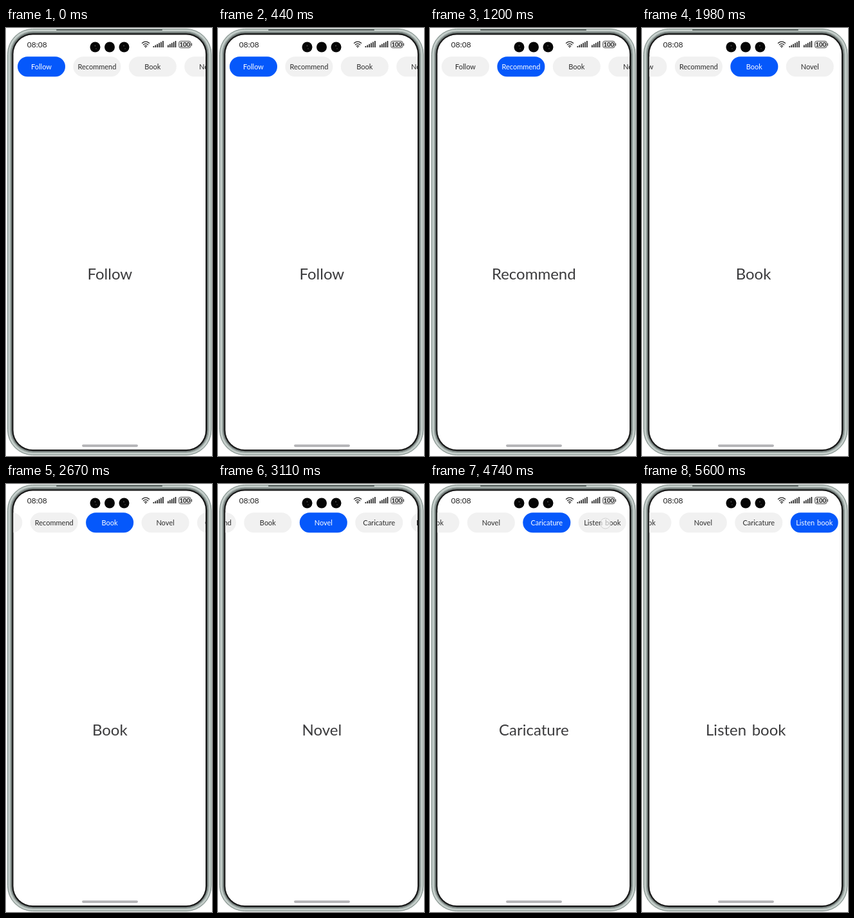
Animation of 320x662 px, one loop 5.81 s. Source, as an HTML page:

```html
<!DOCTYPE html>
<html lang="en">
<head>
<meta charset="utf-8">
<title>Swipe tabs</title>
<style>
  html, body { margin: 0; width: 100%; height: 100%; overflow: hidden; background: #fff; }
  svg { display: block; width: 100%; height: 100%; }
  text { font-family: Lato, "Open Sans", sans-serif; word-spacing: .1em; }
  .mid { text-anchor: middle; }
  .tab { font-size: 11px; fill: #2b2b2b; }
  .tab rect { fill: #f1f1f1; }
  .tab.on { fill: #fff; }
  .tab.on rect { fill: #0558fb; }
  .page { font-size: 24px; fill: #3b3b3d; }
</style>
</head>
<body>
<svg id="stage" viewBox="0 0 320 662">
  <defs>
    <clipPath id="screen"><rect x="11.5" y="10.5" width="298.5" height="641.5" rx="30"/></clipPath>
  </defs>

  <g id="body">
    <rect x="2.5" y="1.5" width="316.5" height="659" rx="39" fill="#a9b5b1" stroke="#82908b"/>
    <rect x="4.8" y="3.5" width="312" height="655" rx="37" fill="none" stroke="#c9d1ce" stroke-width="2"/>
    <rect x="7.5" y="6" width="306.5" height="650" rx="34.5" fill="#6f7876" stroke="#8b9592"/>
    <rect x="9.3" y="8.2" width="303" height="646" rx="32.5" fill="#161616"/>
    <rect x="11.5" y="10.5" width="298.5" height="641.5" rx="30" fill="#fff"/>
    <rect x="78" y="2" width="165" height="2" rx="1" fill="#59615f"/>
  </g>

  <g clip-path="url(#screen)">
    <g id="pages"></g>
    <g id="tabs"></g>
    <circle id="touch" r="8" fill="#f8f8f8" fill-opacity=".65" stroke="#c8c8c8" stroke-width=".8"/>
  </g>

  <g id="status" fill="#222">
    <text x="32.8" y="30" font-size="12">08:08</text>
    <g fill="#050505">
      <circle cx="138.5" cy="29.5" r="8"/>
      <circle cx="161" cy="29.5" r="8"/>
      <circle cx="183.5" cy="29.5" r="8"/>
    </g>
    <g fill="#4a4a4a">
      <circle cx="138.5" cy="27.5" r="1"/><circle cx="140" cy="32" r=".8"/>
      <circle cx="183" cy="27.5" r="1"/><circle cx="185" cy="32" r=".8"/>
    </g>
    <g fill="none" stroke="#222" stroke-width="1.3" stroke-linecap="round">
      <path d="M211.4 23.4q5.6-4.6 11.2 0M213.4 25.8q3.6-3 7.2 0M215.3 28q1.7-1.3 3.4 0"/>
    </g>
    <circle cx="217" cy="29.6" r=".9"/>
    <g id="bars"></g>
    <rect x="268.5" y="20.3" width="18.5" height="10.4" rx="3" fill="#e4e4e4" stroke="#555"/>
    <path d="M288.4 23.5v4" stroke="#555" stroke-width="1.4"/>
    <text x="277.8" y="29.1" class="mid" font-size="9.5" font-weight="700">100</text>
  </g>
  <rect x="118" y="644.3" width="87" height="3.6" rx="1.8" fill="#b3b3b6"/>
</svg>

<script>
const LOOP = 5810, PITCH = 86.4, WIDTH = 298.5, DRAG = 60, HOLD = 70;
const names = ["Follow", "Recommend", "Book", "Novel", "Caricature", "Listen book"];
const scrolls = [0, 0, 66.7, 153, 219.3, 219.3];

// Each move advances one page; taps show a touch point first.
const moves = [
  { at: 852, swipe: true },
  { at: 1740, swipe: true },
  { at: 2670, swipe: true },
  { at: 3840, x: 253, y: 53 },
  { at: 4820, x: 272.5, y: 61 }
];

const $ = id => document.getElementById(id);
const clamp = v => Math.min(1, Math.max(0, v));
const easeOut = v => 1 - (1 - clamp(v)) ** 3;

function add(parent, tag, attrs, text) {
  const el = document.createElementNS("http://www.w3.org/2000/svg", tag);
  for (const key in attrs) el.setAttribute(key, attrs[key]);
  if (text) el.textContent = text;
  parent.appendChild(el);
  return el;
}

const tabs = names.map((name, i) => {
  const tab = add($("tabs"), "g", { class: "tab" });
  add(tab, "rect", { x: 18 + i * PITCH, y: 44.2, width: 74, height: 31, rx: 15.5 });
  add(tab, "text", { x: 55 + i * PITCH, y: 63.6, class: "mid" }, name);
  return tab;
});

names.forEach((name, i) =>
  add($("pages"), "text", { x: 161.3 + i * WIDTH, y: 389, class: "mid page" }, name));

function bars(x, n, low) {
  for (let i = 0; i < n; i++) {
    const h = i < low ? 2 : 2 + (i - low + 1) * 1.6;
    add($("bars"), "rect", { x: x + i * 2.9, y: 30 - h, width: 1.7, height: h });
  }
}
bars(228.5, 6, 1);
bars(251, 5, 0);

function pageShift(move, t) {
  const s = t - move.at;
  if (!move.swipe) return WIDTH * easeOut(s / 300);
  if (s < HOLD) return DRAG * clamp(s / HOLD) ** 2;
  return DRAG + (WIDTH - DRAG) * easeOut((s - HOLD) / 270);
}

function tabShift(move, t) {
  const s = t - move.at;
  return move.swipe ? 1 - Math.exp(-Math.max(0, s - HOLD) / 106) : easeOut(s / 300);
}

function draw(t) {
  let page = 0, scroll = 0, active = 0, tap = null;
  moves.forEach((move, i) => {
    page += pageShift(move, t);
    scroll += (scrolls[i + 1] - scrolls[i]) * tabShift(move, t);
    if (t >= move.at + (move.swipe ? HOLD : 0)) active = i + 1;
    if (!move.swipe && t >= move.at - 80 && t < move.at + 40) tap = move;
  });
  $("pages").setAttribute("transform", `translate(${-page} 0)`);
  $("tabs").setAttribute("transform", `translate(${-scroll} 0)`);
  tabs.forEach((tab, i) => tab.classList.toggle("on", i === active));
  $("touch").setAttribute("visibility", tap ? "visible" : "hidden");
  if (tap) $("touch").setAttribute("transform", `translate(${tap.x} ${tap.y})`);
}

const start = performance.now();
function tick() {
  draw((performance.now() - start) % LOOP);
  requestAnimationFrame(tick);
}
tick();
</script>
</body>
</html>
```
